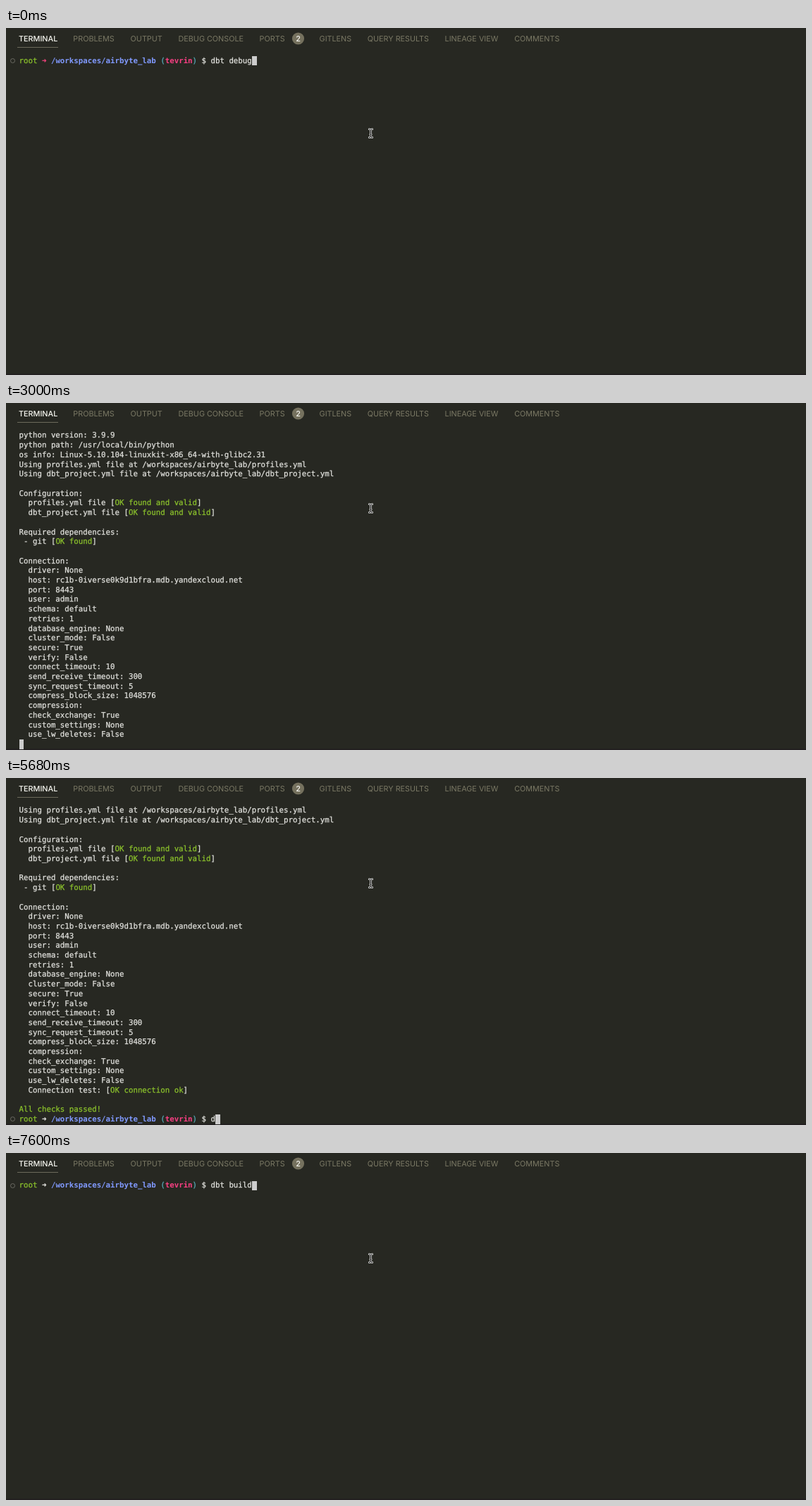
Write an HTML page that moves like this. It is 1135 by 493 pixels and loops after 8000 ms.

```html
<!DOCTYPE html>
<html lang="en">
<head>
<meta charset="utf-8">
<title>Terminal</title>
<style>
  :root {
    --row: 13.71px;
    --col: 6.48px;
    --loop: 8s step-end infinite;
  }
  html, body { margin: 0; width: 100%; height: 100%; overflow: hidden; background: #272822; }
  body { position: relative; text-rendering: geometricPrecision; }

  .chrome { position: absolute; left: 0; top: 0; width: 1135px; height: 493px; }
  .tabs { font: 10.8px Inter, sans-serif; fill: #7b7965; }
  .tabs .on { fill: #f8f8f2; font-weight: 500; }
  .tabs circle { fill: #75715e; }

  .view { position: absolute; left: 0; top: 39.5px; width: 1135px; height: 453.5px; overflow: hidden; }
  .scroll { position: absolute; left: 0; top: 0; width: 100%; animation: scroll var(--loop); }
  .log {
    position: relative; margin: 0; padding-left: 18.6px; overflow: hidden;
    height: var(--row); color: #e2e2de; white-space: pre;
    font: 10.763px/var(--row) "DejaVu Sans Mono", monospace;
    -webkit-text-stroke: 0.25px;
    animation: reveal var(--loop);
  }
  .caret {
    position: absolute; left: 18.6px; top: 0; width: var(--col); height: var(--row);
    background: #ccc; animation: caret var(--loop);
  }
  .typed { position: absolute; width: 0; overflow: hidden; animation: type var(--loop); }
  .prompt::before {
    content: ""; position: absolute; left: 6px; margin-top: 3.5px; box-sizing: border-box;
    width: 7px; height: 7px; border: 1px solid #6c6b64; border-radius: 50%;
  }
  .arrow { display: inline-block; width: var(--col); }
  .fail { color: #f0437c; }
  .ok { color: #8cc32c; }
  .path { color: #819aff; font-weight: bold; -webkit-text-stroke: 0; }
  .paren { color: #56adbc; }
  .branch { color: #fb3f84; font-weight: bold; -webkit-text-stroke: 0; }

  @keyframes scroll {
    0% { top: 0; }
    37.5% { top: calc(-3 * var(--row)); }
    50.5% { top: calc(-6 * var(--row)); }
    95%, 100% { top: calc(-38 * var(--row)); }
  }
  @keyframes reveal {
    0% { height: var(--row); }
    35.625% { height: calc(8 * var(--row)); }
    37.5% { height: calc(35 * var(--row)); }
    50.5% { height: calc(38 * var(--row)); }
    52.375%, 100% { height: calc(39 * var(--row)); }
  }
  @keyframes caret {
    0% { top: 0; margin-left: calc(51 * var(--col)); }
    9.375% { top: var(--row); margin-left: 0; }
    35.625% { top: calc(9 * var(--row)); margin-left: 0; }
    37.5% { top: calc(35 * var(--row)); margin-left: 0; }
    50.5% { top: calc(38 * var(--row)); margin-left: 0; }
    52.375% { top: calc(38 * var(--row)); margin-left: calc(42 * var(--col)); }
    71% { top: calc(38 * var(--row)); margin-left: calc(43 * var(--col)); }
    72.875% { top: calc(38 * var(--row)); margin-left: calc(45 * var(--col)); }
    76.5% { top: calc(38 * var(--row)); margin-left: calc(46 * var(--col)); }
    78.375% { top: calc(38 * var(--row)); margin-left: calc(47 * var(--col)); }
    80.125% { top: calc(38 * var(--row)); margin-left: calc(48 * var(--col)); }
    82% { top: calc(38 * var(--row)); margin-left: calc(49 * var(--col)); }
    83.75% { top: calc(38 * var(--row)); margin-left: calc(50 * var(--col)); }
    85.625%, 100% { top: calc(38 * var(--row)); margin-left: calc(51 * var(--col)); }
  }
  @keyframes type {
    0% { width: 0; }
    71% { width: var(--col); }
    72.875% { width: calc(3 * var(--col)); }
    76.5% { width: calc(4 * var(--col)); }
    78.375% { width: calc(5 * var(--col)); }
    80.125% { width: calc(6 * var(--col)); }
    82% { width: calc(7 * var(--col)); }
    83.75% { width: calc(8 * var(--col)); }
    85.625%, 100% { width: calc(9 * var(--col)); }
  }
</style>
</head>
<body>
<svg class="chrome" viewBox="0 0 1135 493">
  <g class="tabs">
    <text class="on" x="18" y="19">TERMINAL</text>
    <text x="95.3" y="19">PROBLEMS</text>
    <text x="176.6" y="19">OUTPUT</text>
    <text x="244.5" y="19">DEBUG CONSOLE</text>
    <text x="359.6" y="19">PORTS</text>
    <text x="444.6" y="19">GITLENS</text>
    <text x="512.8" y="19">QUERY RESULTS</text>
    <text x="622.6" y="19">LINEAGE VIEW</text>
    <text x="721.2" y="19">COMMENTS</text>
    <circle cx="414.5" cy="15" r="8.6"/>
    <text class="on" x="414.5" y="19" text-anchor="middle">2</text>
  </g>
  <rect x="16" y="27" width="58" height="1" fill="#6c6a5c"/>
  <rect y="491" width="1135" height="2" fill="#222020"/>
</svg>

<div class="view">
  <div class="scroll">
    <pre class="log"><span class="prompt"><span class="ok">root</span> <b class="arrow fail">➜</b> <span class="path">/workspaces/airbyte_lab</span> <span class="paren">(</span><span class="branch">tevrin</span><span class="paren">)</span> $ dbt debug</span>
19:17:16  Running with dbt=1.4.6
dbt version: 1.4.6
python version: 3.9.9
python path: /usr/local/bin/python
os info: Linux-5.10.104-linuxkit-x86_64-with-glibc2.31
Using profiles.yml file at /workspaces/airbyte_lab/profiles.yml
Using dbt_project.yml file at /workspaces/airbyte_lab/dbt_project.yml

Configuration:
  profiles.yml file [<span class="ok">OK found and valid</span>]
  dbt_project.yml file [<span class="ok">OK found and valid</span>]

Required dependencies:
 - git [<span class="ok">OK found</span>]

Connection:
  driver: None
  host: rc1b-0iverse0k9d1bfra.mdb.yandexcloud.net
  port: 8443
  user: admin
  schema: default
  retries: 1
  database_engine: None
  cluster_mode: False
  secure: True
  verify: False
  connect_timeout: 10
  send_receive_timeout: 300
  sync_request_timeout: 5
  compress_block_size: 1048576
  compression:
  check_exchange: True
  custom_settings: None
  use_lw_deletes: False
  Connection test: [<span class="ok">OK connection ok</span>]

<span class="ok">All checks passed!</span>
<span class="prompt"><span class="ok">root</span> <b class="arrow">➜</b> <span class="path">/workspaces/airbyte_lab</span> <span class="paren">(</span><span class="branch">tevrin</span><span class="paren">)</span> $ <span class="typed">dbt build</span></span></pre>
    <div class="caret"></div>
  </div>
</div>

<svg class="chrome" viewBox="0 0 1135 493" fill="none" stroke-linecap="round">
  <defs>
    <path id="beam" d="M515.2 143.8q2.3 0 2.3 1.8v8.2q0 1.8-2.3 1.8M519.8 143.8q-2.3 0-2.3 1.8v8.2q0 1.8 2.3 1.8M516.8 151.3h1.4"/>
  </defs>
  <use href="#beam" stroke="#f4f4f4" stroke-width="2.5"/>
  <use href="#beam" stroke="#111" stroke-width="1"/>
</svg>
</body>
</html>
```
